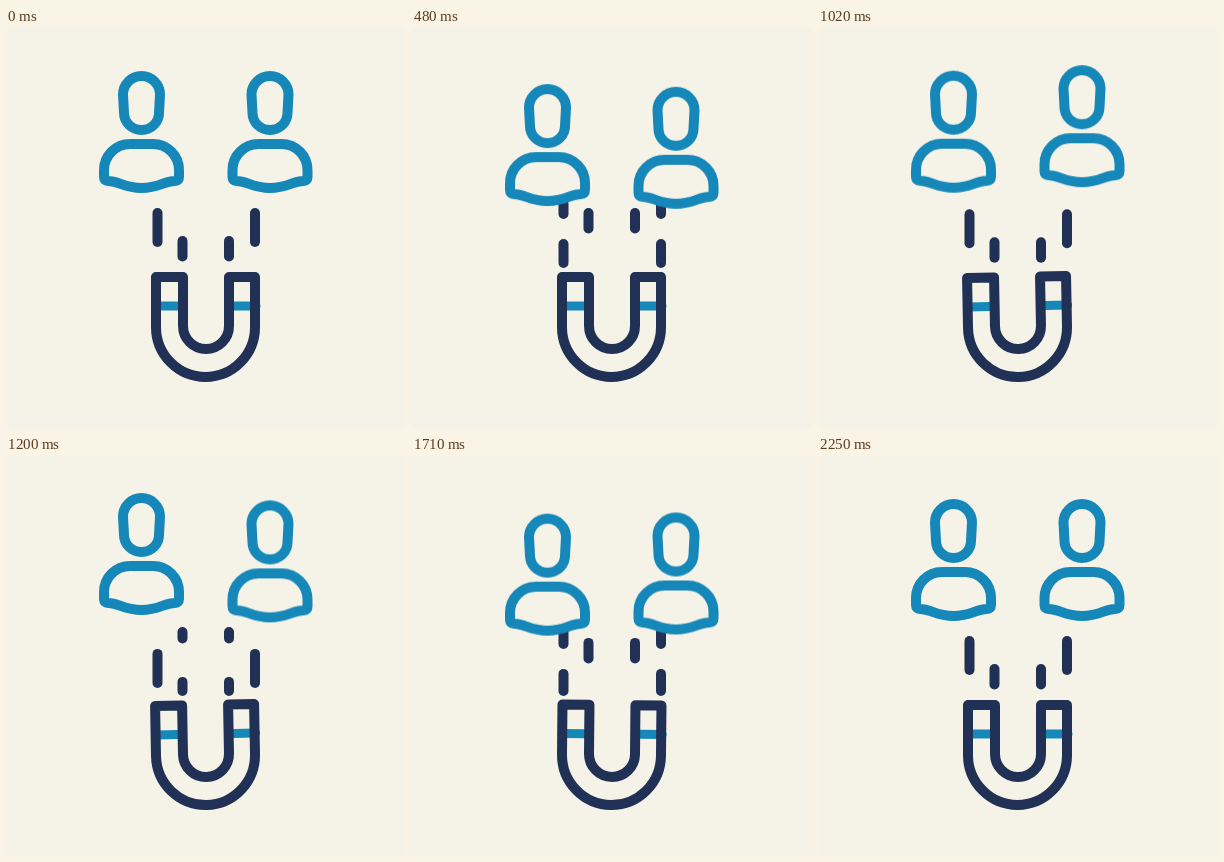
An HTML page that plays this animation: 400x400 px, repeating every 2340 ms.

```html
<!DOCTYPE html>
<html lang="en">
<head>
<meta charset="utf-8">
<title>Magnet attracting people</title>
<style>
  html, body { margin: 0; width: 100%; height: 100%; overflow: hidden; background: #f5f2e7; }
  svg { display: block; width: 100vw; height: 100vh; }
  g { fill: none; stroke-width: 10; stroke-linecap: round; stroke-linejoin: round; }
  .navy { stroke: #213155; }
  .blue { stroke: #1588b9; }
  .outer { stroke-dasharray: 29 30; }
  .inner { stroke-dasharray: 15.5 43.5; }
</style>
</head>
<body>
<svg viewBox="0 0 400 400">
  <defs>
    <g id="person">
      <path d="M117 66.5A18.5 18.5 0 0 1 154 66.5L153 85A17.5 17 0 0 1 118 85Z"/>
      <path d="M98 142A26 26 0 0 1 124 116H147A26 26 0 0 1 173 142V149Q173 153 169 153C158 153 153 160 135.5 160C118 160 113 153 102 153Q98 153 98 149Z"/>
    </g>
  </defs>
  <g class="navy">
    <path class="outer" d="M151.5 176V235"/>
    <path class="inner" d="M176.5 176V235"/>
    <path class="inner" d="M223 176V235"/>
    <path class="outer" d="M249 176V235"/>
  </g>
  <g id="magnet">
    <path class="blue" stroke-width="9" d="M151 278H172M228 278H250"/>
    <path class="navy" d="M150 249H177V298A23 23 0 0 0 223 298V249H249V299A49.5 50 0 0 1 150 299Z"/>
  </g>
  <g class="blue">
    <g id="left"><use href="#person"/></g>
    <g id="right"><use href="#person" x="128.5"/></g>
  </g>
</svg>
<script>
  const STEP = 30, STEPS = 75, LOOP = 2340;
  const SMOOTH = 'cubic-bezier(.333,0,.667,1)';
  const anims = [];

  // keys: [step, value, easing towards the next key]
  function track(el, keys, style) {
    const frames = keys.map(([step, value, easing = SMOOTH]) =>
      ({ offset: step / STEPS, easing, ...style(value) }));
    const anim = el.animate(frames, { duration: STEP * STEPS, fill: 'both' });
    anim.pause();
    anims.push(anim);
  }

  const moveY = y => ({ transform: `translate(0px, ${y}px)` });
  track(document.getElementById('left'), [[0, 0], [22, 16], [40, -6], [60, 16], [75, 0]], moveY);
  track(document.getElementById('right'), [[0, 0], [15, 16], [33, -6], [51, 16], [75, 0]], moveY);

  // Each dash wraps around a line of length 59.
  const flow = [[0, 0], [31, 59, 'cubic-bezier(.4,0,.4,1)'], [75, 177]];
  for (const [name, start] of [['.outer', 9], ['.inner', 37]]) {
    for (const el of document.querySelectorAll(name)) {
      track(el, flow, d => ({ strokeDashoffset: `${-start - d}px` }));
    }
  }

  const magnet = document.getElementById('magnet');
  function tilt(step) {
    if (step < 16.9 || step > 73.1) return 0;
    return -1.1 * Math.sin(Math.PI * (step / 3.125 - 0.4));
  }

  const begin = performance.now();
  function draw(now) {
    const t = Math.max(0, now - begin) % LOOP;
    const step = Math.min(STEPS, Math.floor(t / STEP));
    for (const anim of anims) anim.currentTime = step * STEP;
    magnet.setAttribute('transform', `rotate(${tilt(step)} 199.5 299)`);
    requestAnimationFrame(draw);
  }
  draw(begin);
</script>
</body>
</html>
```
